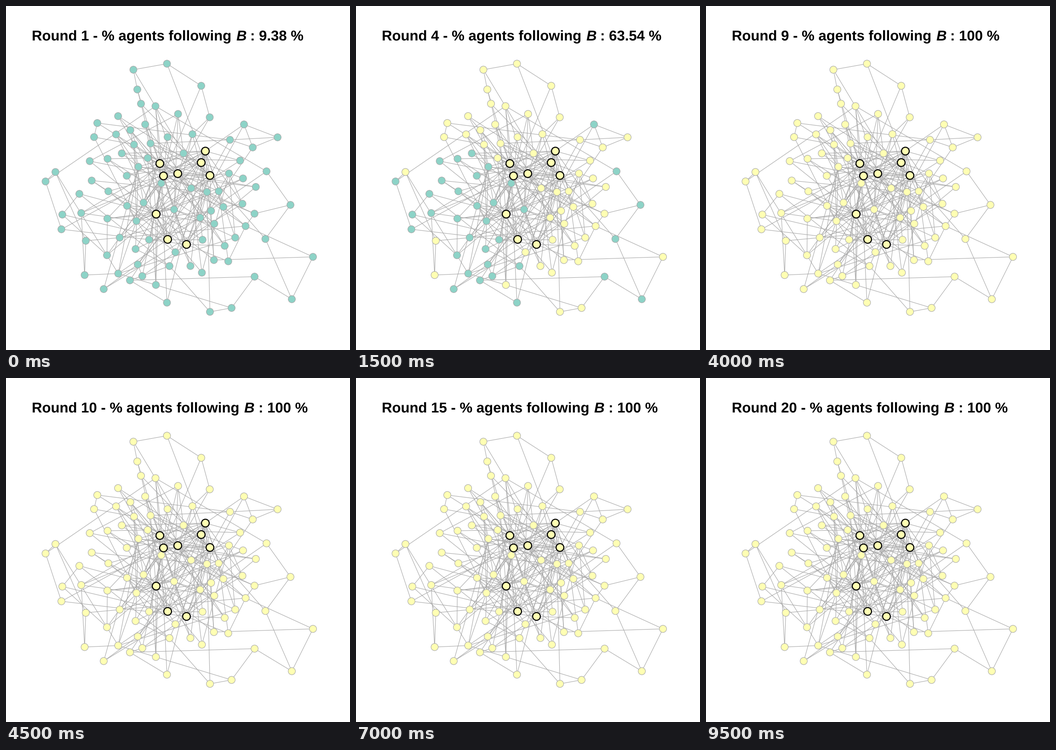
Animation of 748 by 748 pixels, one loop 10 s. Source, as a matplotlib script:

```python
import matplotlib.pyplot as plt
import numpy as np
from matplotlib.animation import FuncAnimation
from matplotlib.collections import LineCollection

STAGE, DPI = 748, 88
PX = 72 / DPI  # points per pixel
ROUNDS, ROUND_MS = 20, 500
TEAL, YELLOW, GREY = "#8DD3C7", "#FFFFB3", "#A9A9A9"
FOLLOWERS = [9, 34, 51, 61, 67, 72, 85, 96]  # per round, until all follow
CENTRE, SLOW_POCKET = (345, 410), (220, 470)

SEEDS = [(433, 315), (423.5, 340), (443, 368), (372.5, 363.5), (333.5, 341.5),
         (341.5, 368.5), (325.5, 452), (350.5, 506.5), (391.5, 518)]
HUBS = [(337, 385), (365, 442), (436.5, 404)]
# Rim agents as chains of linked neighbours.
QUICK_CHAINS = [
    [(293, 212), (285, 181), (276.5, 138), (349.5, 125), (424, 173),
     (442.5, 241.5)],
    [(198, 254), (191, 284.5)],
    [(536, 307), (590, 285), (486.5, 290.5)],
    [(443, 664.5), (490, 656)],
    [(107, 360.5), (173, 510), (170.5, 584.5)],
    [(520.5, 478), (667, 545)]]
SLOW_CHAINS = [
    [(517, 257)],
    [(349.5, 644.5), (269, 596), (355, 565)],
    [(566, 359), (618, 432), (563.5, 506), (621, 637), (540, 588)],
    [(212, 615), (286, 561.5)],
    [(159, 408), (122, 453)],
    [(120, 485), (85.5, 381)]]

rng = np.random.default_rng(7)


def spread(points, total, radius=200, tries=15):
    """Fill the inner disc, keeping each new agent far from the others."""
    points = np.array(points, float)
    while len(points) < total:
        angle = rng.uniform(0, 2 * np.pi, tries)
        reach = radius * np.sqrt(rng.random(tries))
        options = CENTRE + np.c_[reach * np.cos(angle), reach * np.sin(angle)]
        gaps = np.linalg.norm(options[:, None] - points, axis=2).min(axis=1)
        points = np.vstack([points, options[gaps.argmax()]])
    return points


core = len(SEEDS) + len(HUBS)
quick, slow = sum(QUICK_CHAINS, []), sum(SLOW_CHAINS, [])
rim_end = core + len(quick) + len(slow)
places = spread(SEEDS + HUBS + quick + slow, FOLLOWERS[-1])
gaps = np.linalg.norm(places[:, None] - places, axis=2)
from_centre = np.linalg.norm(places - CENTRE, axis=1)


def build_links():
    """Chains first, then three ties per agent, favouring popular neighbours."""
    linked = np.zeros(gaps.shape, bool)

    def tie(a, b):
        linked[a, b] = linked[b, a] = True

    start = core
    for chain in QUICK_CHAINS + SLOW_CHAINS:
        for agent in range(start, start + len(chain) - 1):
            tie(agent, agent + 1)
        start += len(chain)
    for agent in range(core, rim_end):
        if from_centre[agent] > 255:
            rim = np.arange(core, rim_end)
            rim = rim[rim != agent]
            tie(agent, rim[gaps[agent, rim].argmin()])

    outward = sorted(range(core, len(places)), key=lambda a: from_centre[a])
    order = list(range(core)) + outward
    for i, agent in enumerate(order):
        earlier = np.array([a for a in order[:i] if not linked[agent, a]], int)
        missing = min(3 - linked[agent].sum(), len(earlier))
        if missing > 0:
            popularity = linked[earlier].sum(axis=1) + 0.5 + 2 * (earlier < core)
            pull = popularity * np.exp(-gaps[agent, earlier] / 130)
            for friend in rng.choice(earlier, missing, replace=False,
                                     p=pull / pull.sum()):
                tie(agent, friend)
    return np.argwhere(np.triu(linked))


def joining_rounds():
    """Agents near the slow pocket and on the slow rim follow last."""
    first = len(SEEDS)
    score = np.full(len(places), -1.0)
    score[core:core + len(quick)] = np.linspace(0.3, 0.62, len(quick))
    score[core + len(quick):rim_end] = np.linspace(0.84, 1, len(slow))
    inner = np.r_[first:core, rim_end:len(places)]
    nearness = -np.linalg.norm(places[inner] - SLOW_POCKET, axis=1)
    score[inner] = nearness.argsort().argsort() / len(inner)
    rank = score.argsort(kind="stable").argsort()
    return np.searchsorted(FOLLOWERS, rank, side="right") + 1


joined = joining_rounds()

plt.rcParams.update({"font.family": "Liberation Sans", "text.hinting": "none"})
fig = plt.figure(figsize=(STAGE / DPI, STAGE / DPI), dpi=DPI, facecolor="white")
ax = fig.add_axes([0, 0, 1, 1])
ax.set(xlim=(-0.5, STAGE - 0.5), ylim=(STAGE - 0.5, -0.5))
ax.axis("off")
ax.add_collection(LineCollection(places[build_links()], colors=GREY,
                                 linewidths=1.1 * PX, zorder=1))


def draw_agents(points, radius, edge, width, zorder):
    return ax.scatter(*points.T, s=(2 * radius * PX) ** 2, c=YELLOW, snap=False,
                      edgecolors=edge, linewidths=width * PX, zorder=zorder)


first = len(SEEDS)
draw_agents(places[:first], 8.4, "black", 2.3, 3)
others = draw_agents(places[first:], 7.8, GREY, 1.1, 2)

EM, TITLE_X, BASELINE = 31.2, 56, 74.5


def title_part(text, style="normal"):
    return ax.text(TITLE_X, BASELINE, text, fontsize=EM * PX, weight="bold",
                   style=style, va="baseline", ha="left")


lead, letter, tail = title_part(""), title_part("B", "italic"), title_part("")


def update(frame):
    turn = frame + 1
    following = joined <= turn
    others.set_facecolor([YELLOW if f else TEAL for f in following[first:]])
    share = round(100 * following.sum() / len(places), 2)
    lead.set_text(f"Round {turn} - % agents following")
    letter_x = TITLE_X + EM * (13.668 + 0.556 * len(str(turn)))
    letter.set_x(letter_x)
    tail.set_x(letter_x + EM)
    tail.set_text(f": {share:g} %")
    return others, lead, letter, tail


animation = FuncAnimation(fig, update, frames=ROUNDS, interval=ROUND_MS,
                          init_func=lambda: update(0), repeat=True,
                          repeat_delay=0, blit=False)
plt.show()
```
